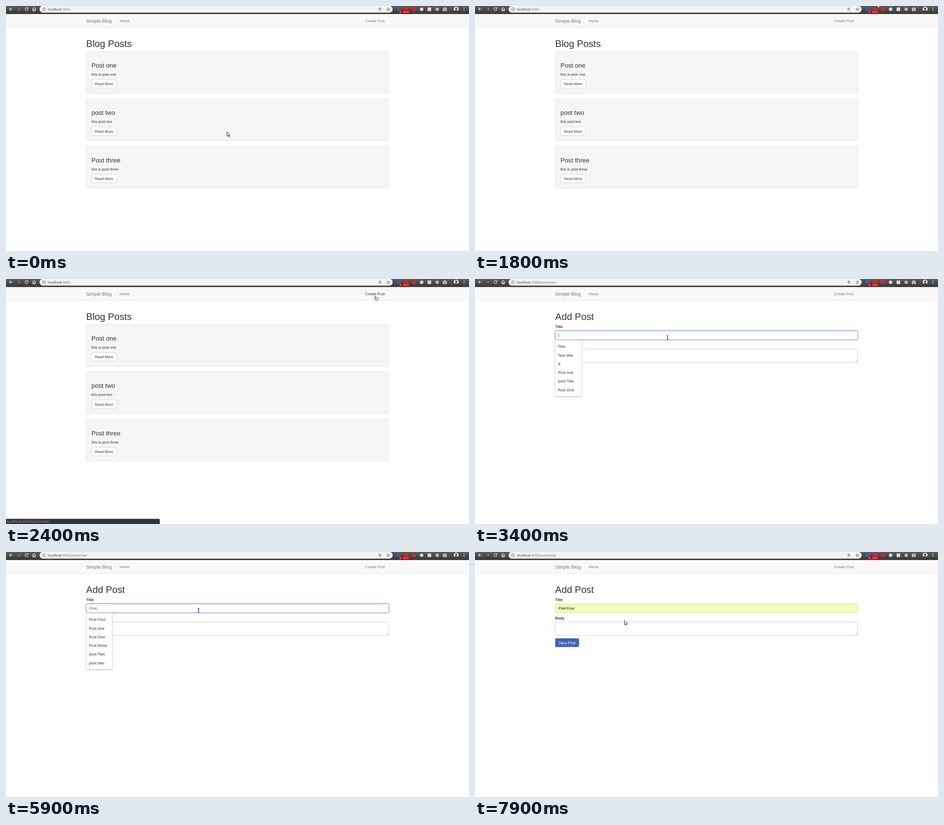
These frames come from a looping animation (1028x545 px, 8000 ms). An HTML page:

```html
<!DOCTYPE html>
<html lang="en">
<head>
<meta charset="utf-8">
<title>Simple Blog</title>
<style>
html, body { margin: 0; width: 100%; height: 100%; overflow: hidden; background: #fff; }
svg { display: block; width: 100vw; height: 100vh; }
text { font: 8.25px "Liberation Sans", Arial, sans-serif; fill: #333; text-rendering: geometricPrecision; white-space: pre; }
.h1 { font-size: 21.2px; }
.h3 { font-size: 14.1px; }
.brand { font-size: 10.6px; fill: #777; }
.nav { fill: #777; }
.bold { font-weight: bold; }
.ui { font: 7.28px "Noto Sans", "Open Sans", sans-serif; }
.item { font-size: 8.35px; fill: #222; }
.badge { font: 5.6px "Noto Sans", sans-serif; fill: #fff; }
</style>
</head>
<body>
<svg id="stage" viewBox="0 0 1028 545" preserveAspectRatio="none">
  <defs>
    <linearGradient id="bar" x2="0" y2="1">
      <stop stop-color="#5c5c5c"/><stop offset="1" stop-color="#373737"/>
    </linearGradient>
    <filter id="soft" x="-10%" y="-10%" width="120%" height="120%"><feGaussianBlur stdDeviation="1"/></filter>
  </defs>
  <rect width="1028" height="545" fill="#fff"/>

  <g id="navbar">
    <rect y="17" width="1028" height="30.5" fill="#f8f8f8"/>
    <rect y="47.3" width="1028" height=".8" fill="#e2e2e2"/>
    <text class="brand" x="178" y="37">Simple Blog</text>
    <text class="nav" x="252.3" y="36">Home</text>
    <text class="nav" id="create" x="797.5" y="36">Create Post</text>
  </g>

  <g id="list"><text class="h1" x="178" y="90.7">Blog Posts</text></g>

  <g id="form">
    <text class="h1" x="178" y="90.7">Add Post</text>
    <text class="bold" x="178" y="109.4">Title</text>
    <rect id="glow" x="177.6" y="114.9" width="672.8" height="20.6" rx="3" fill="none" stroke="#8ab4f0" stroke-width="1.6" filter="url(#soft)"/>
    <rect id="field" x="178.3" y="115.5" width="671.4" height="19.4" rx="2.2" stroke-width=".8"/>
    <text id="value" x="185.5" y="128"></text>
    <rect id="caret" y="120.3" width=".8" height="9.6" fill="#444"/>
    <text class="bold" x="178" y="150">Body</text>
    <rect x="178.3" y="156" width="671.4" height="29.5" rx="2.2" fill="#fff" stroke="#c6c6c6" stroke-width=".8"/>
    <path d="M844.6 184.6l4-4M846.8 184.6l1.8-1.8" stroke="#777" stroke-width=".6"/>
    <rect x="178.3" y="192.3" width="52.4" height="18.8" rx="2.3" fill="#4562b9" stroke="#3a56aa" stroke-width=".6"/>
    <text x="185.5" y="205" style="fill:#fff">Save Post</text>
    <g id="menu">
      <rect x="178" y="137" width="58" height="125" rx="1.5" fill="#000" opacity=".35" filter="url(#soft)"/>
      <rect x="177.8" y="136" width="58.2" height="125" rx="1.2" fill="#fff" stroke="#c8c8c8" stroke-width=".5"/>
    </g>
  </g>

  <g id="status">
    <path d="M0 533.5H339.5a2 2 0 0 1 2 2V545H0Z" fill="#333435"/>
    <text class="ui" x="1" y="542.2" style="font-size:7.9px;fill:#9b9b9b">localhost:3000/posts/new</text>
  </g>

  <g id="toolbar">
    <rect width="1028" height="17.5" fill="url(#bar)"/>
    <rect y="16.8" width="1028" height=".8" fill="#2c2c2c"/>
    <rect x="74.5" y="-.3" width="784" height="15" rx="7.5" fill="#f1f3f4"/>
    <g fill="none" stroke="#eee" stroke-width="1.1">
      <path d="M15 7H8M11.2 3.6L7.8 7l3.4 3.4"/>
      <path d="M24.5 7h7M28.3 3.6L31.7 7l-3.4 3.4" stroke="#858585"/>
      <path d="M48.2 5.2A3.3 3.3 0 1 0 48.6 8M48.8 3v2.7h-2.7"/>
      <path d="M58.3 7.3l4.2-3.9 4.2 3.9M59.7 6.5v4.4h1.9V8.2h1.8v2.7h1.9V6.5"/>
    </g>
    <g fill="none" stroke="#555" stroke-width=".8">
      <circle cx="84.2" cy="7.3" r="3.4"/>
      <path d="M84.2 6.8v2.5M84.2 5.1v.9"/>
      <circle cx="829.8" cy="6.5" r="2.4"/>
      <path d="M831.6 8.3l2.6 2.6M828.6 6.5h2.4M829.8 5.3v2.4"/>
      <path d="M849 3.6l1 2.6 2.8.1-2.2 1.8.8 2.7-2.4-1.6-2.4 1.6.8-2.7-2.2-1.8 2.8-.1Z"/>
    </g>
    <text class="ui" x="92.8" y="9.9">localhost<tspan id="path" fill="#777"></tspan></text>
    <rect x="867.5" y="3" width="8.5" height="8.5" fill="#2867b2"/>
    <rect x="884" y="3" width="8.5" height="7" fill="#c8332c"/>
    <rect x="872" y="9" width="7" height="7" rx="1" fill="#d8000c"/>
    <text class="badge" x="874" y="14.6">6</text>
    <rect x="881" y="9" width="15" height="7" rx="1" fill="#d8000c"/>
    <text class="badge" x="882.1" y="14.6">5231</text>
    <circle cx="905.8" cy="7.2" r="4.5" fill="#e0241f"/>
    <circle cx="922.8" cy="7.3" r="3.8" fill="#dedede"/>
    <rect x="936" y="3.3" width="8" height="8" fill="#d8d8d8"/>
    <circle cx="957.4" cy="7.2" r="3.8" fill="#b8b8b8"/>
    <path d="M970 4.6h2l1-1.4h2.6l1 1.4h2v6.6H970Z" fill="#d4d4d4"/>
    <circle cx="974.3" cy="7.8" r="1.9" fill="none" stroke="#444" stroke-width=".9"/>
    <rect x="988" y="2" width=".7" height="11" fill="#666"/>
    <circle cx="999.5" cy="6.8" r="5.4" fill="#f2f2f2"/>
    <path d="M995.6 10.4q3.9-3.4 7.8 0a5.4 5.4 0 0 1-7.8 0Z" fill="#333"/>
    <circle cx="999.5" cy="5.8" r="2.3" fill="#333"/>
    <g fill="#eee"><circle cx="1017" cy="3.8" r=".9"/><circle cx="1017" cy="7" r=".9"/><circle cx="1017" cy="10.2" r=".9"/></g>
  </g>

  <g id="cursor" stroke-linejoin="round">
    <path id="arrow" d="M.3 .4V9.6L2.5 7.7 3.9 10.8 5.5 10.1 4.1 7H6.9Z" fill="#fff" stroke="#111" stroke-width=".95"/>
    <path id="hand" d="M-.7 5V.6Q0-.4 .7 .6V3.2L4.6 3.9Q5.7 4.2 5.5 5.4L4.8 8.7H-.3L-2.7 5.9Q-2.8 4.8-1.7 5Z" fill="#fff" stroke="#111" stroke-width=".95"/>
    <g id="beam" fill="none">
      <path d="M-2-4H2M0-4V4M-2 4H2" stroke="#fff" stroke-width="2.2"/>
      <path d="M-2.1-4.1H2.1M0-4V4M-2.1 4.1H2.1" stroke="#222" stroke-width="1.2"/>
    </g>
  </g>
</svg>
<script>
const LOOP = 8000;
const $ = id => document.getElementById(id);
const svgNode = (parent, tag, attrs, text = '') => {
  const el = document.createElementNS('http://www.w3.org/2000/svg', tag);
  for (const k in attrs) el.setAttribute(k, attrs[k]);
  el.textContent = text;
  return parent.appendChild(el);
};
const show = (id, on) => $(id).setAttribute('display', on ? 'inline' : 'none');
const between = (t, a, b) => t >= a && t < b;

// Blog cards
[['Post one', 'this is post one'], ['post two', 'this post two'], ['Post three', 'this is post three']]
  .forEach(([title, body], i) => {
    const g = svgNode($('list'), 'g', { transform: `translate(0 ${i * 105.4})` });
    svgNode(g, 'rect', { x: 178.3, y: 101.2, width: 671.4, height: 93, rx: 2.2, fill: '#f5f5f5', stroke: '#dedede', 'stroke-width': .8 });
    svgNode(g, 'text', { class: 'h3', x: 189.8, y: 137 }, title);
    svgNode(g, 'text', { x: 189.8, y: 154.8 }, body);
    svgNode(g, 'rect', { x: 190.2, y: 163.5, width: 55.4, height: 19, rx: 2.3, fill: '#fff', stroke: '#c8c8c8', 'stroke-width': .8 });
    svgNode(g, 'text', { x: 197.3, y: 176.2 }, 'Read More');
  });

const recent = ['Test', 'Test title', 'd', 'Post one', 'post Two', 'Post One'];
const matches = ['Post Four', 'Post one', 'Post One', 'Post three', 'post Two', 'post two'];
const items = recent.map((s, i) =>
  svgNode($('menu'), 'text', { class: 'ui item', x: 184.3, y: 153.2 + i * 19.3 }));

// Pointer positions, each held until the next: time, x, y
const moves = [
  [0, 490.5, 280], [300, 504, 268], [400, 512, 248], [500, 482, 214], [600, 412, 176],
  [700, 352, 157], [800, 330, 154], [900, 366, 166], [1000, 428, 189], [1100, 469, 202],
  [1500, 690, 92], [1600, 892, -4], [1800, 893, -5], [1900, 889, -1], [2000, 878, 8],
  [2100, 861, 20], [2200, 842, 31], [2300, 828, 36], [2400, 820.5, 38.3],
  [3400, 427.5, 130.5], [7300, 342, 139], [7500, 331.5, 152.2]
];
const typed = [[0, ''], [4500, 'Po'], [4800, 'Pos'], [5300, 'Post '], [7000, 'Post Four']];
const at = (keys, t) => keys.filter(k => k[0] <= t).pop();

function drawForm(t) {
  const filled = t >= 7000, focused = t < 7900;
  const value = at(typed, t)[1];
  $('value').textContent = value;
  $('value').style.fill = filled ? '#000' : '#555';
  $('field').setAttribute('fill', filled ? '#f0ffb5' : '#fff');
  $('field').setAttribute('stroke', focused ? '#6c98e6' : '#c6ccae');
  show('glow', focused);
  show('caret', t < 3900 || between(t, 4500, 5900) || between(t, 7000, 7500));
  $('caret').setAttribute('x', 185.3 + (value ? $('value').getComputedTextLength() : 0));
  show('menu', !filled);
  const options = value ? matches : recent;
  items.forEach((el, i) => el.textContent = options[i]);
}

function render(t) {
  const onForm = t >= 3400, hover = between(t, 2200, 3400);
  show('list', !onForm);
  show('form', onForm);
  show('status', between(t, 2300, 3400));
  $('create').style.fill = hover ? '#333' : '#777';
  $('path').textContent = onForm ? ':3000/posts/new' : ':3000';
  if (onForm) drawForm(t);

  const [, x, y] = at(moves, t);
  const beam = between(t, 3400, 7300);
  $('cursor').setAttribute('transform', `translate(${x} ${y})`);
  show('hand', hover);
  show('beam', beam);
  show('arrow', !hover && !beam);
}

const start = performance.now();
function tick() {
  render((performance.now() - start) % LOOP);
  requestAnimationFrame(tick);
}
tick();
</script>
</body>
</html>
```
